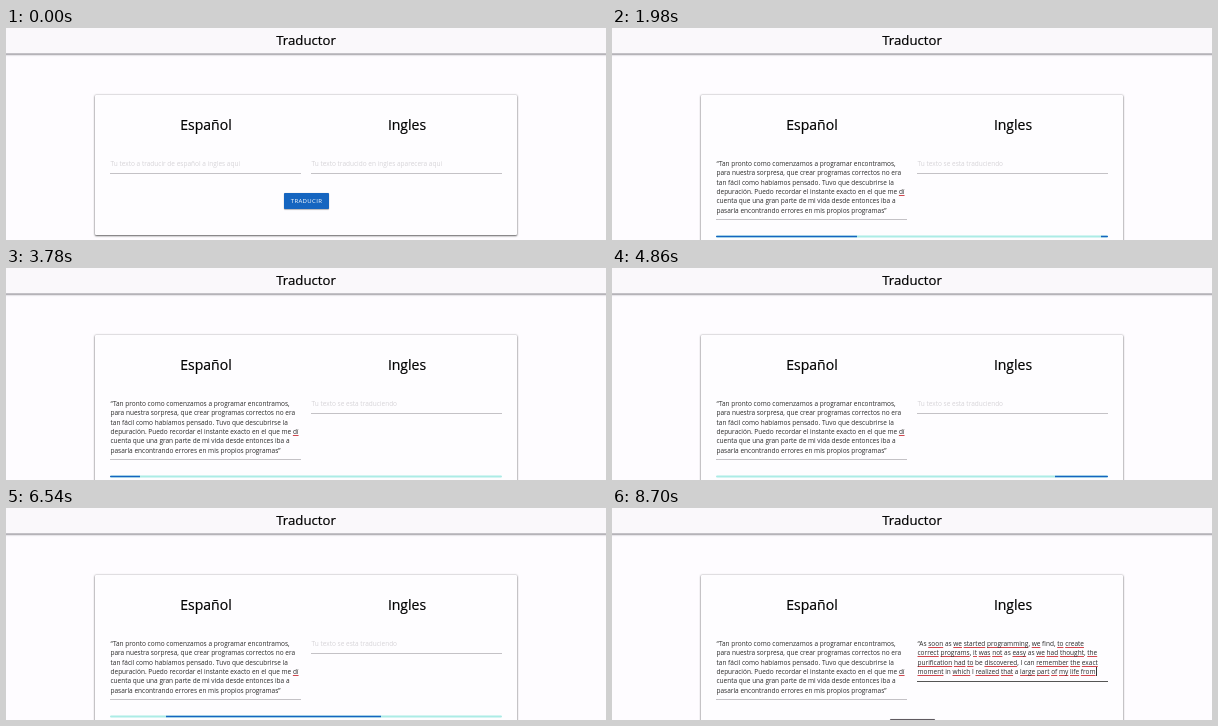
An HTML page that plays this animation: 600x212 px, repeating every 9 s.

```html
<!DOCTYPE html>
<html lang="es">
<head>
<meta charset="utf-8">
<title>Traductor</title>
<style>
  html, body { margin: 0; width: 100%; height: 100%; overflow: hidden; background: #fefcff; }
  body { font: 6.5px/9.3px "Open Sans", "Noto Sans", sans-serif; color: #2a2a2a; }
  #stage { position: relative; width: 600px; height: 212px; overflow: hidden; }
  #stage > * { position: absolute; box-sizing: border-box; white-space: nowrap; }
  [hidden] { display: none !important; }

  h1, h2 { margin: 0; font-weight: 400; line-height: 20px; text-align: center; color: #000;
           -webkit-text-stroke: .2px #000; }
  h1 { inset: 0 0 auto; height: 25px; padding-top: 2.3px; font-size: 13.2px; background: #faf8fb;
       box-shadow: 0 1px 0 #c3c1c6, 0 2px 0 #b5b3b8, 0 3px 1px #e8e6ea; }
  h2 { top: 86.6px; width: 192px; font-size: 14px; }
  #card { left: 89px; top: 67px; width: 422px; height: 140px; background: #fefdff; border-radius: 1px;
          box-shadow: 0 1px 2px rgba(0,0,0,.55), 0 0 2px rgba(0,0,0,.35); }

  .left { left: 104px; }
  .right { left: 305px; }
  .text { top: 131.1px; padding-left: .5px; white-space: pre !important; }
  .hint { color: #d6d4d8; }
  .line { top: 145px; width: 191px; height: 1px; background: #c4c2c6; }
  .focus { background: #55b8af; box-shadow: 0 1px 0 #9ad6d0; opacity: 0; }
  u { text-decoration: underline 1px #d2474e; text-underline-offset: 1px; text-decoration-skip-ink: none; }
  #caret { position: relative; }
  #caret::after { content: ""; position: absolute; left: 0; top: 0; width: 1px; height: 9px; background: #333; }

  #button { left: 278px; top: 165px; width: 45px; height: 16px; border-radius: 1px; background: #1565c0;
            color: #fff; font-size: 6px; line-height: 17px; letter-spacing: .35px; text-align: center;
            box-shadow: 0 0 1px rgba(0,0,0,.3), 0 1px 1px rgba(0,0,0,.25); }
  #button.low { top: 211px; background: #5f5a60; }

  #bar { --pos: 0; left: 104px; top: 207px; width: 392px; height: 2px; transform: translateY(.5px);
         overflow: hidden; border-radius: 1px; background: #acece6; }
  #bar::before, #bar::after { content: ""; position: absolute; top: 0; bottom: 0; left: 0; background: #1565c0; }
  #bar::before { animation: long 2100ms cubic-bezier(.65,.815,.735,.395) calc(var(--pos) * -1ms) infinite paused; }
  #bar::after { animation: short 2100ms cubic-bezier(.165,.84,.44,1) calc(1150ms - var(--pos) * 1ms) infinite paused; }
  @keyframes long {
    0% { left: -35%; right: 100%; }
    60%, 100% { left: 100%; right: -90%; }
  }
  @keyframes short {
    0% { left: -200%; right: 100%; }
    60%, 100% { left: 107%; right: -8%; }
  }
</style>
</head>
<body>
<div id="stage">
  <h1>Traductor</h1>
  <div id="card"></div>
  <h2 class="left">Español</h2>
  <h2 class="right">Ingles</h2>

  <div class="text hint left" id="hintLeft">Tu texto a traducir de español a ingles aqui</div>
  <div class="text left" id="spanish">“Tan pronto como comenzamos a programar encontramos,
para nuestra sorpresa, que crear programas correctos no era
tan fácil como habíamos pensado. Tuvo que descubrirse la
depuración. Puedo recordar el instante exacto en el que me <u>dí</u>
cuenta que una gran parte de mi vida desde entonces iba a
pasarla encontrando errores en mis propios programas”</div>
  <div class="line left" id="lineLeft"></div>
  <div class="line left focus" id="focusLeft"></div>

  <div class="text hint right" id="hintRight"></div>
  <div class="text right" id="english"></div>
  <div class="line right" id="lineRight"></div>

  <div id="button">TRADUCIR</div>
  <div id="bar"></div>
</div>
<script>
const LOOP = 9000, STEP = 60;
const FOCUS = 360, PASTE = 540, SEND = 1200, DONE = 6840, SELECT = 7020, CHECK = 7800;
const BAR_RATE = 99.58 / STEP;   // progress time passed per clock time
const FADE = 180;

const el = Object.fromEntries([...document.querySelectorAll("[id]")].map(e => [e.id, e]));
const ramp = (t, start) => t < start ? 0 : Math.min(1, (t - start + STEP) / FADE);

const english = `“As soon as we started programming, we find, to create
correct programs, it was not as easy as we had thought, the
purification had to be discovered, I can remember the exact
moment in which I realized that a large part of my life from`;
const unmarked = new Set(["As", "as", "a", "I", "in", "be", "can", "find"]);
const checked = english.replace(/[A-Za-z]+/g, w => unmarked.has(w) ? w : `<u>${w}</u>`)
  + '<span id="caret"></span>';

let shownEnglish = "";
function showEnglish(html) {
  if (html !== shownEnglish) el.english.innerHTML = shownEnglish = html;
}

function draw(t) {
  const pasted = t >= PASTE, busy = t >= SEND && t < DONE, done = t >= DONE;

  el.hintLeft.hidden = pasted;
  el.spanish.hidden = !pasted;
  el.card.style.height = pasted ? "186px" : "140px";
  el.lineLeft.style.top = el.focusLeft.style.top = pasted ? "191px" : "145px";
  el.focusLeft.style.opacity = ramp(t, FOCUS) * (1 - ramp(t, SEND));

  el.hintRight.hidden = done;
  el.hintRight.textContent = t < SEND
    ? "Tu texto traducido en ingles aparecera aqui" : "Tu texto se esta traduciendo";
  showEnglish(!done ? "" : t < CHECK ? english : checked);
  const caret = document.getElementById("caret");
  if (caret) caret.hidden = Math.floor((t - CHECK) / 300) % 2 === 0;
  el.lineRight.style.top = done ? "173px" : "145px";
  el.lineRight.style.background = `color-mix(in srgb, #555 ${100 * ramp(t, SELECT)}%, #c4c2c6)`;

  el.button.hidden = busy;
  el.button.classList.toggle("low", pasted);
  el.bar.hidden = !busy;
  el.bar.style.setProperty("--pos", (1253 + (t - 1980) * BAR_RATE).toFixed(1));
}

let start;
function tick(now) {
  start ??= now;
  draw(Math.floor(((now - start) % LOOP) / STEP) * STEP);
  requestAnimationFrame(tick);
}
draw(0);
requestAnimationFrame(tick);
</script>
</body>
</html>
```
